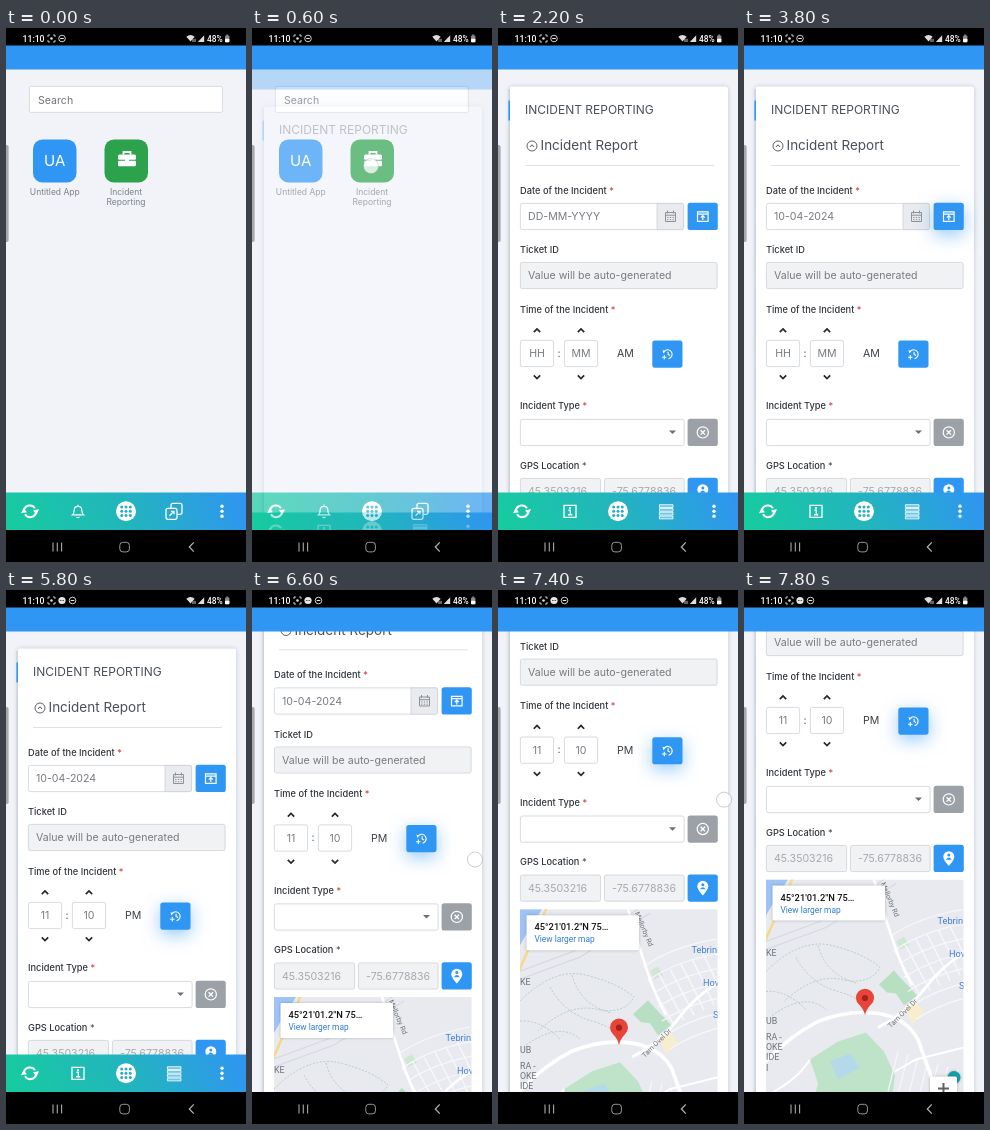
Recreate the animation shown at these times as an HTML page with a canvas. Size 240 px wide and 534 px high, loop 8000 ms.

```html
<!DOCTYPE html>
<html lang="en">
<head>
<meta charset="utf-8">
<title>Incident reporting</title>
<style>
html, body { margin: 0; width: 100%; height: 100%; overflow: hidden; background: #000; }
canvas { display: block; width: 100vw; height: 100vh; }
</style>
</head>
<body>
<canvas id="stage"></canvas>
<script>
const W = 240, H = 534, LOOP = 8000, STEP = 200;
const TOP = 17.5, BAR = 41.6, FOOT = 464.6, NAV = 502;
const BLUE = '#2f96f3', PAGE = '#f1f3f9', INK = '#495057';
const INTER = 'Inter, sans-serif', ROBOTO = 'Roboto, sans-serif';

const stage = document.getElementById('stage');
const main = stage.getContext('2d');
const layer = document.createElement('canvas').getContext('2d');
let c = main, k = 1;

const clamp = (v) => Math.max(0, Math.min(1, v));
const ease = (v) => { v = clamp(v); return v * v * (3 - 2 * v); };

// Drawing helpers
function rect(x, y, w, h, fill, r = 0, line) {
  c.beginPath();
  c.roundRect(x, y, w, h, r);
  if (fill) { c.fillStyle = fill; c.fill(); }
  if (line) { c.strokeStyle = line; c.lineWidth = 0.8; c.stroke(); }
}
function disc(x, y, r, fill) {
  c.beginPath();
  c.arc(x, y, r, 0, 7);
  c.fillStyle = fill;
  c.fill();
}
function ring(x, y, r, color, w = 1) {
  c.beginPath();
  c.arc(x, y, r, 0, 7);
  c.strokeStyle = color;
  c.lineWidth = w;
  c.stroke();
}
function line(d, color, w = 1, dash = []) {
  c.strokeStyle = color;
  c.lineWidth = w;
  c.setLineDash(dash);
  c.stroke(new Path2D(d));
  c.setLineDash([]);
}
function area(d, color) {
  c.fillStyle = color;
  c.fill(new Path2D(d));
}
// y is the middle of the capitals
function text(s, x, y, size, color, { weight = 400, align = 'left', font = INTER } = {}) {
  c.font = `${weight} ${size}px ${font}`;
  c.textAlign = align;
  c.fillStyle = color;
  c.fillText(s, x, y + size * 0.36);
}
function at(x, y, draw, turn = 0) {
  c.save();
  c.translate(x, y);
  c.rotate(turn);
  draw();
  c.restore();
}
function clipped(x, y, w, h, draw) {
  c.save();
  c.beginPath();
  c.rect(x, y, w, h);
  c.clip();
  draw();
  c.restore();
}

// Icons, drawn around their own centre
const icons = {
  sync() {
    line('M-6 -1 A6 6 0 0 1 5 -3 M6 1 A6 6 0 0 1 -5 3', '#fff', 2);
    area('M9 -2 L3 -1 L6.5 3.4 Z M-9 2 L-3 1 L-6.5 -3.4 Z', '#fff');
  },
  bell() {
    line('M-5.5 3.5 Q-3.8 2 -3.8 -1 Q-3.8 -5 0 -5 Q3.8 -5 3.8 -1 Q3.8 2 5.5 3.5 Z M0 -5 V-6.5 M-1.5 5.5 Q0 7 1.5 5.5', '#fff', 1.2);
  },
  info() {
    line('M-6 -6 H6 V6 H-6 Z', '#fff', 1.3);
    line('M-1.6 -1 H0.3 V3.4 M-2 3.4 H2.2', '#fff', 1.4);
    disc(0, -3.3, 1.1, '#fff');
  },
  grid() {
    disc(0, 0, 10, '#fff');
    for (let i = 0; i < 9; i++) disc((i % 3 - 1) * 4.3, (Math.floor(i / 3) - 1) * 4.3, 1.5, '#27adcb');
  },
  copy() {
    line('M-3 -3 V-6 Q-3 -8 -1 -8 H6 Q8 -8 8 -6 V1 Q8 3 6 3 H3', '#fff', 1.3);
    line('M-6 -3 H1 Q3 -3 3 -1 V6 Q3 8 1 8 H-6 Q-8 8 -8 6 V-1 Q-8 -3 -6 -3 M-4.5 4.5 L0 0 M-3 0 H0 V3', '#fff', 1.3);
  },
  list() {
    for (let i = 0; i < 4; i++) rect(-6.6, -6.6 + i * 3.8, 13.6, 2.8, 'rgba(255,255,255,.35)', 0, '#fff');
  },
  more() {
    for (const y of [-5, 0, 5]) disc(0, y, 1.7, '#fff');
  },
  briefcase() {
    rect(-9, -4.5, 18, 5.2, '#fff', 1.5);
    rect(-9, 1.7, 18, 5.6, '#fff', 1.2);
    rect(-2, 0, 4, 3, '#fff', 0.5);
    line('M-3.5 -4.5 V-7 H3.5 V-4.5', '#fff', 1.8);
  },
  calendar() {
    line('M-5 -4 H5 V5 H-5 Z M-5 -1.3 H5 M-3 -6 V-3 M3 -6 V-3', '#8d9298', 1);
    line('M-3.4 1 H4 M-3.4 3.2 H4', '#8d9298', 1, [1.4, 1.3]);
  },
  today() {
    line('M-5.3 -4.5 H5.3 V5 H-5.3 Z M-5.3 -2.3 H5.3 M0 3.5 V-0.6 M-2 1.3 L0 -0.8 L2 1.3', '#fff', 1.2);
  },
  clock() {
    line('M-3.4 -2.6 A4.5 4.5 0 1 1 1 4.6 M0.6 -2.4 V0.4 L2.6 1.4 M-5.4 3.2 H-1 M-3.2 1 V5.4', '#fff', 1.1);
    area('M-5 -4 L-2 -2.8 L-4.2 -0.6 Z', '#fff');
  },
  clear() {
    ring(0, 0, 5.6, '#fff', 1.2);
    line('M-2.2 -2.2 L2.2 2.2 M2.2 -2.2 L-2.2 2.2', '#fff', 1.3);
  },
  place() {
    area('M0 7.5 Q-5.5 1.6 -5.5 -1.7 A5.5 5.5 0 0 1 5.5 -1.7 Q5.5 1.6 0 7.5 Z', '#fff');
    disc(0, -3.4, 1.5, BLUE);
    area('M-2.9 1.3 Q0 -3 2.9 1.3 Z', BLUE);
  }
};
const icon = (name, x, y) => at(x, y, icons[name]);

function touch(x, y) {
  disc(x, y, 7.5, 'rgba(255,255,255,.75)');
  ring(x, y, 7.5, 'rgba(120,125,130,.55)', 0.7);
}

function header() {
  rect(0, 17, W, BAR - 17, BLUE);
}
function footer(second, fourth, shift = 0) {
  at(0, shift, () => {
    const g = c.createLinearGradient(20, 530, 220, 440);
    g.addColorStop(0, '#17cba0');
    g.addColorStop(0.5, '#22b5bd');
    g.addColorStop(1, '#2f96f0');
    rect(0, FOOT, W, NAV - FOOT, g);
    ['sync', second, 'grid', fourth, 'more'].forEach((n, i) => icon(n, 24 + i * 48, 483.3));
  });
}

function home() {
  rect(0, 17, W, 485, PAGE);
  header();
  rect(23.4, 58.4, 193, 26, '#fff', 1.5, '#d2d5d9');
  text('Search', 32, 72, 10.6, '#6f747a');
  rect(27, 111.5, 43.5, 43, BLUE, 9.5);
  text('UA', 48.7, 133, 15, '#fff', { align: 'center' });
  rect(98.5, 111.5, 43.5, 43, '#2ca24d', 9.5);
  icon('briefcase', 121, 131);
  const caption = (s, x, y) => text(s, x, y, 8.5, '#7d8187', { align: 'center' });
  caption('Untitled App', 48.8, 164);
  caption('Incident', 120, 164);
  caption('Reporting', 120, 174);
  footer('bell', 'copy');
}

function label(s, y, star) {
  text(s, 22, y, 9.25, '#30353a', { weight: 500 });
  if (star) text('*', 22 + c.measureText(s + ' ').width, y, 9.25, star);
}
function field(x, y, w, value, off) {
  rect(x + 0.4, y + 0.4, w - 0.8, 26.2, off ? '#f1f2f4' : '#fff', 2, '#cdd1d6');
  clipped(x, y, w - 7, 27, () => text(value, x + 8, y + 13.5, 10.6, off === 'dim' ? '#a6aaaf' : '#767b81'));
}
function button(x, y, name, color = BLUE, lit = false) {
  c.save();
  if (lit) {
    c.shadowColor = 'rgba(47,150,243,.5)';
    c.shadowBlur = 17 * k;
    c.shadowOffsetY = 5 * k;
  }
  rect(x - 0.4, y - 0.2, 30.2, 27.2, color, 2.6);
  c.restore();
  icon(name, x + 14.8, y + 13.4);
}
function spinner(x, value) {
  const chevron = (y, d) => line(`M${x - 3.2} ${y + d} L${x} ${y - d} L${x + 3.2} ${y + d}`, '#25292d', 1.7);
  chevron(302.5, 1.6);
  chevron(349, -1.6);
  rect(x - 16.6, 312.4, 33.2, 26.2, '#fff', 2, '#cdd1d6');
  text(value, x, 325.5, 10.6, '#767b81', { align: 'center' });
}

function map() {
  rect(0, 0, 198, 250, '#e8eaef');
  area('M0 0 H22 L8 22 L0 36 Z', '#9fc3f5');
  line('M-2 64 L27 -2', '#f6d98c', 2.6);
  // parks, pond, school ground
  area('M113 105 L128 91 L137 101 L145 109 L151 116 L138 126 L130 114 L121 113 Z', '#b9dfc2');
  area('M140 130 L150 122 L158 134 L146 145 Z', '#f7eecd');
  area('M130 62 L138 57 L143 66 L134 70 Z', '#cfe8d4');
  area('M44 180 L72 162 L100 153 L118 172 L129 196 L122 250 H40 L52 204 Z', '#bfe3c8');
  area('M64 182 L84 174 L94 188 L72 200 Z', '#b4daea');
  // residential streets
  for (let i = 0; i < 7; i++) {
    line(`M${128 + i * 11} ${70 - i * 5} q12 22 ${26 - i} 46`, '#f7f8fa', 1.4);
    line(`M${126 + i * 4} ${56 + i * 14} q26 -18 70 -26`, '#f7f8fa', 1.2);
    line(`M${132 + i * 10} ${172 + i * 3} l-10 40`, '#f7f8fa', 1.2);
  }
  line('M0 62 L54 42 L118 0 M0 70 L60 48 L130 4', '#d6dae1', 1.2);
  line('M40 130 Q20 110 0 112 M0 92 Q34 58 66 66 T114 88 Q104 106 76 100 T18 122 M30 78 Q44 104 72 112 T98 132 M52 66 Q60 96 92 104 M6 136 Q40 112 60 130', '#b0cabc', 0.9, [2, 1.6]);
  line('M108 0 Q122 48 130 70 T146 106', '#fff', 2.6);
  line('M0 182 Q24 156 52 142 Q82 130 112 134 Q140 138 152 160 L174 222', '#fff', 3.6);
  line('M112 148 Q140 134 158 110 T198 74', '#fff', 2.8);
  line('M0 216 Q30 202 44 180 M129 192 L150 180 L198 168', '#fff', 2);

  const street = (s, x, y, turn) => at(x, y, () => text(s, 0, 0, 7, '#6d7278', { font: ROBOTO }), turn);
  street('Mellorby Rd', 117, 3, 1.17);
  street('Tarn Ovel Dr', 123, 147, -0.78);
  [['KE', 73], ['UB', 141], ['RA -', 157], ['OKE', 167], ['IDE', 177], ['I', 188]]
    .forEach(([s, y]) => text(s, 0, y, 8.8, '#6d7278', { font: ROBOTO }));
  [['Tebrin', 171.5, 41], ['Hov', 183, 74], ['S', 193, 106]]
    .forEach(([s, x, y]) => text(s, x, y, 9.2, '#3f7fd6', { font: ROBOTO }));

  area('M99 136 Q98 130 93 125 A9 9 0 1 1 105 125 Q100 130 99 136 Z', '#e8443a');
  disc(99, 118.5, 3.1, '#a5201a');

  c.save();
  c.shadowColor = 'rgba(0,0,0,.25)';
  c.shadowBlur = 3 * k;
  rect(6.5, 6, 112.5, 35, '#fff', 1);
  disc(188, 198, 6.5, '#159fae');
  rect(164, 197, 27, 54, '#fff', 1.5);
  c.restore();
  text('45°21\'01.2"N 75…', 14.5, 17.8, 9.3, '#111', { font: ROBOTO, weight: 500 });
  text('View larger map', 14.5, 30, 8.4, '#2b7bd6', { font: ROBOTO });
  line('M172 209 H183 M177.5 203.5 V214.5', '#5d6166', 2);
}

function fields(t) {
  const dated = t >= 3000, timed = t >= 5400;
  ring(34, 118, 5, INK, 0.9);
  line('M31.8 119 L34 116.8 L36.2 119', INK, 1);
  text('Incident Report', 42.5, 117.3, 13.5, INK);
  rect(27, 137, 189, 0.8, '#d5d8dc');

  label('Date of the Incident', 162.5, '#d9363e');
  field(22, 175, 164, dated ? '10-04-2024' : 'DD-MM-YYYY');
  rect(159, 175.4, 26.6, 26.2, '#e9ebef', [0, 2, 2, 0], '#cdd1d6');
  icon('calendar', 172.5, 188.5);
  button(190, 175, 'today', BLUE, t >= 2800 && t < 5200);

  label('Ticket ID', 222);
  field(22, 234, 197.5, 'Value will be auto-generated', true);

  label('Time of the Incident', 281.5, '#d9363e');
  spinner(39, timed ? '11' : 'HH');
  text(':', 61, 325, 10.6, INK, { align: 'center' });
  spinner(83, timed ? '10' : 'MM');
  text(timed ? 'PM' : 'AM', 119, 325.5, 10.6, '#3c4146');
  button(154.7, 312.7, 'clock', BLUE, timed);

  label('Incident Type', 378, '#d9363e');
  field(22, 391, 164.5, '');
  area('M171 402.5 H178 L174.5 406 Z', '#6b7076');
  button(190, 391, 'clear', '#9ca1a8');

  label('GPS Location', 437.5, INK);
  field(22, 450, 81, '45.3503216', 'dim');
  field(106, 450, 80.5, '-75.6778836', 'dim');
  button(190, 450, 'place');
  at(22, 484.5, () => clipped(0, 0, 197.5, 250, map));
}

function form(t, scroll) {
  rect(0, 17, W, 485, PAGE);
  at(0, -scroll, () => {
    c.save();
    c.shadowColor = 'rgba(60,80,110,.28)';
    c.shadowBlur = 4 * k;
    rect(11.5, 58.5, 218.5, 760, '#fff', 3);
    c.restore();
    rect(10.6, 61, 1.2, 755, '#c6cbd5');
    rect(10.4, 72.5, 1.6, 20, BLUE);
    text('INCIDENT REPORTING', 27, 81.5, 12, INK);
    if (t >= 1000) fields(t);
  });
  header();
  footer('info', 'list', 38 * clamp((scroll - 5) / 60));
}

function chrome(t) {
  rect(-1, 117, 3.6, 97, '#a6a8ab', 2);
  rect(0, 0, W, TOP, '#000');
  const bar = { font: ROBOTO, weight: 500 };
  text('11:10', 16.5, 10.5, 8.7, '#fff', bar);
  line('M42 9 V7 H44 M47 7 H49 V9 M49 12 V14 H47 M44 14 H42 V12', '#ddd', 0.9);
  disc(45.5, 10.5, 1.3, '#ddd');
  const late = t >= 5200;
  if (late) {
    disc(56, 10.5, 3.6, '#e6e6e6');
    line('M54 10.5 h4', '#444', 1, [0.9, 0.6]);
  }
  const x = late ? 66.5 : 56;
  ring(x, 10.5, 3.3, '#e6e6e6', 0.9);
  line(`M${x - 1.8} 10.5 h3.6`, '#e6e6e6', 1.1);
  area('M180.3 8.8 Q184.5 5.4 188.7 8.8 L184.5 13.5 Z', '#ddd');
  line('M187 14 V10.8 M189 14 V10.8', '#ddd', 0.9);
  area('M191.8 14 L198.2 14 V7.2 Z', '#ddd');
  text('48%', 201, 10.6, 8.4, '#fff', bar);
  rect(219, 7.5, 4.4, 6.7, '#8a8a8a', 1);
  rect(219, 10.7, 4.4, 3.5, '#fff', 0.8);
  rect(220.2, 6.6, 2, 1, '#aaa');

  rect(0, NAV, W, 32, '#000');
  line('M47 514.5 V523.5 M51.3 514.5 V523.5 M55.6 514.5 V523.5', '#a9a9a9', 1.1);
  rect(113.8, 514.3, 9.6, 9.6, null, 3, '#bdbdbd');
  line('M187.8 514.3 L183.3 519 L187.8 523.7', '#b5b5b5', 1.2);
}

function render(t) {
  const first = 155 * ease((t - 6200) / 800);
  const scroll = first + 40 * ease((t - 7200) / 600);
  const fade = t < 600 ? 0 : t < 800 ? 0.3 : t < 1000 ? 0.9 : 1;
  const rise = t < 800 ? 20 : t < 1000 ? 3 : 0;
  c = main;
  if (fade < 1) {
    home();
    if (t >= 200 && t < 800) touch(119, 138);
  }
  if (fade) {
    c = layer;
    form(t, scroll);
    c = main;
    c.save();
    c.globalAlpha = fade;
    // only the area between the system bars
    c.drawImage(layer.canvas, 0, 17 * k, layer.canvas.width, 485 * k, 0, 17 + rise, W, 485);
    c.restore();
  }
  if (t >= 2600 && t < 3000) touch(205, 188);
  if (t >= 5200 && t < 5600) touch(169, 327);
  if (t >= 6200 && t < 7200) touch(223, 347 - first);
  if (t >= 7400 && t < 7800) touch(226, 220 - (scroll - 155));
  chrome(t);
}

function resize() {
  k = innerWidth * (devicePixelRatio || 1) / W;
  for (const g of [main, layer]) {
    g.canvas.width = Math.round(W * k);
    g.canvas.height = Math.round(H * k);
    g.setTransform(k, 0, 0, k, 0, 0);
  }
}

const start = performance.now();
function tick() {
  const t = Math.max(0, performance.now() - start) % LOOP;
  render(Math.floor(t / STEP) * STEP);
  requestAnimationFrame(tick);
}
addEventListener('resize', resize);
resize();
tick();
</script>
</body>
</html>
```
